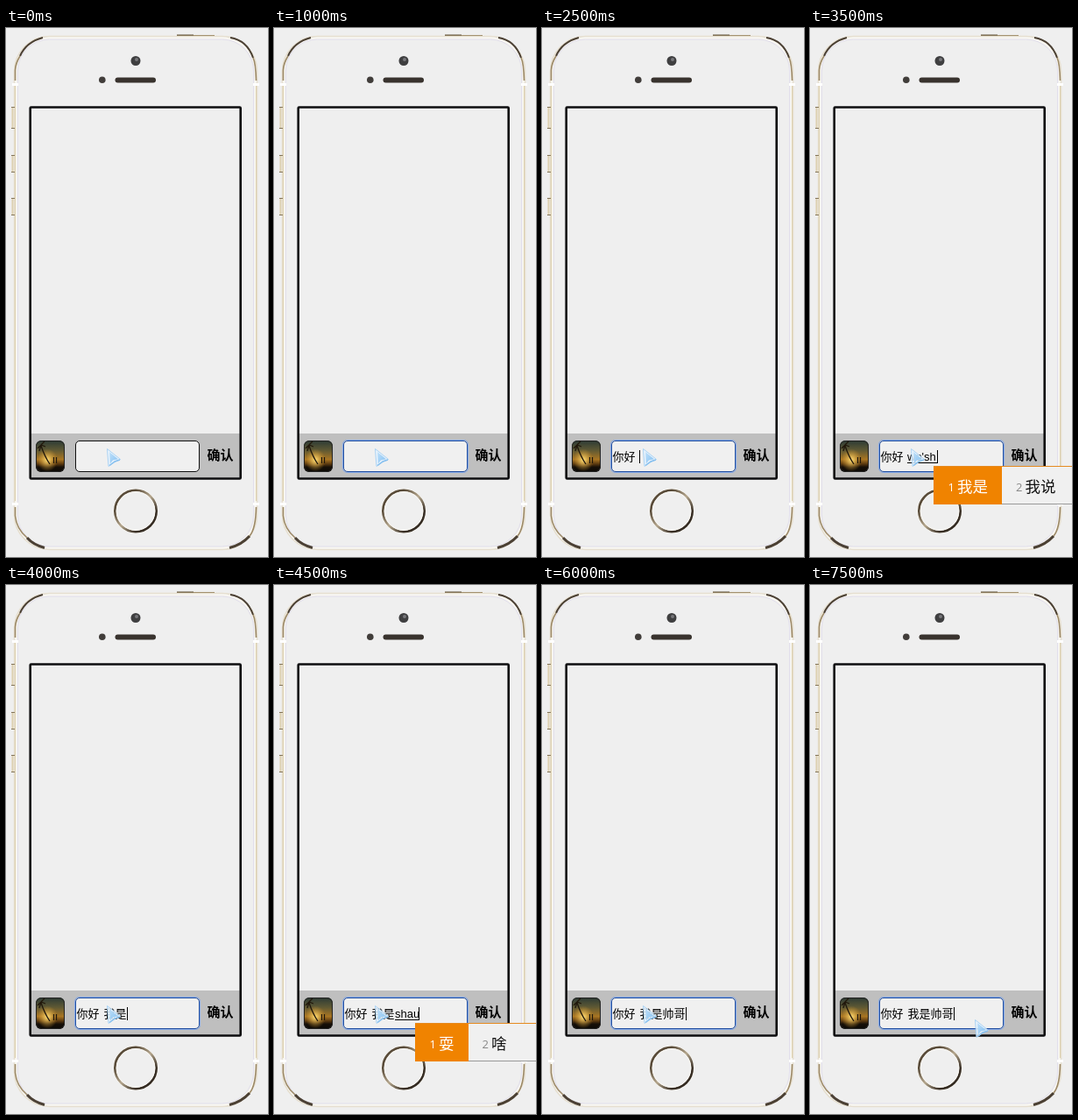
An HTML page for the animation above (8 s loop, 299 by 604 pixels).

```html
<!DOCTYPE html>
<html lang="zh-CN">
<head>
<meta charset="utf-8">
<title>Chat input</title>
<style>
  html, body { margin: 0; width: 100%; height: 100%; overflow: hidden; background: #efefef; }
  svg { display: block; width: 299px; height: 604px; }
  text { font-family: "Liberation Sans", "Noto Sans CJK SC", "Noto Sans CJK", sans-serif; white-space: pre; }
  .typed { font-size: 13px; word-spacing: 1.4px; fill: #000; }
  .word { font: 17.5px "Noto Sans CJK SC", "Noto Sans CJK", sans-serif; fill: #111; }
  .num { font: 13px "Open Sans", sans-serif; fill: #888; }
  .first .word, .first .num { fill: #fff; }
  .confirm { font: bold 15px "Noto Sans CJK SC", "Noto Sans CJK", sans-serif; }
</style>
</head>
<body>
<svg viewBox="0 0 299 604">
  <defs>
    <linearGradient id="ring" x1="0" y1="0" x2="1" y2="1">
      <stop offset="0" stop-color="#5d4f3d"/><stop offset=".25" stop-color="#574937"/>
      <stop offset=".5" stop-color="#b5a78e"/><stop offset=".75" stop-color="#3a3026"/>
      <stop offset="1" stop-color="#2c241c"/>
    </linearGradient>
    <linearGradient id="sky" x1="0" y1="0" x2="0" y2="1">
      <stop offset="0" stop-color="#2c3a35"/><stop offset=".3" stop-color="#5d5834"/>
      <stop offset=".6" stop-color="#a87522"/><stop offset=".74" stop-color="#5c3a10"/>
      <stop offset=".84" stop-color="#171008"/><stop offset="1" stop-color="#0b0906"/>
    </linearGradient>
    <radialGradient id="sun" cx=".4" cy=".62" r=".36">
      <stop offset="0" stop-color="#ffe07a"/><stop offset="1" stop-color="#d9982a" stop-opacity="0"/>
    </radialGradient>
    <linearGradient id="arrow" x1="0" y1="0" x2="1" y2="1">
      <stop offset="0" stop-color="#b9defa"/><stop offset="1" stop-color="#7dbcf0"/>
    </linearGradient>
    <clipPath id="thumb"><rect x="34" y="471" width="33" height="36" rx="6"/></clipPath>
  </defs>

  <!-- phone body -->
  <g fill="none">
    <rect x="9.500" y="9.500" width="277" height="586" rx="40" stroke="#e6dfcf" stroke-width="1.600"/>
    <rect x="11.500" y="11.500" width="273" height="582" rx="38" stroke="#f9f7f1" stroke-width="2"/>
    <rect x="13.500" y="13" width="269" height="579" rx="36" stroke="#e2dfec"/>
    <path d="M10.500 66V540M285.500 66V540" stroke="#dccfae"/>
    <g stroke="#4b4034" stroke-width="2">
      <path d="M16 32Q23 16 42 11M256 11Q275 14 282 34"/>
      <path d="M24 582Q31 590 44 593.500M255 593.500Q269 590 278 580" stroke-width="3"/>
    </g>
    <g stroke="#9c8967" stroke-width="1.600">
      <path d="M10.500 60V48Q11 40 16 32M282 34Q285 40 285.500 60"/>
      <path d="M10.500 547V557Q12 572 24 582M278 580Q285 572 285.500 547"/>
    </g>
    <path d="M195 8.500H238" stroke="#a3916f"/>
    <path d="M195 8H214" stroke="#65573f"/>
    <path d="M7.500 90V115M7.500 145V165M7.500 194V214" stroke="#ddd0b0" stroke-width="2"/>
    <path d="M6 90.500H10M6 114.500H10M6 145.500H10M6 164.500H10M6 194.500H10M6 213.500H10" stroke="#83755a"/>
    <path d="M7 64.500H14M282 64.500H289M7 543.500H14M282 543.500H289" stroke="#fff" stroke-width="3"/>
    <circle cx="148" cy="551.500" r="25.300" stroke="#f8f6f0"/>
    <circle cx="148" cy="551.500" r="23.700" stroke="url(#ring)" stroke-width="2.600"/>
    <circle cx="148" cy="551.500" r="21.800" stroke="#faf8f3"/>
  </g>
  <circle cx="148" cy="37.500" r="5.500" fill="#3f3f40"/>
  <circle cx="149" cy="36" r="2" fill="#77777a"/>
  <circle cx="109.800" cy="59.300" r="3.800" fill="#413d3a"/>
  <rect x="124.500" y="56.500" width="46.500" height="6" rx="3" fill="#39332e"/>

  <!-- screen and input bar -->
  <rect x="28" y="463" width="240" height="51" fill="#bfbfbf"/>
  <rect x="27.700" y="90.500" width="240" height="424" rx="1" fill="none" stroke="#0e0e10" stroke-width="2.600"/>
  <g clip-path="url(#thumb)">
    <rect x="34" y="471" width="33" height="36" fill="url(#sky)"/>
    <rect x="34" y="471" width="33" height="36" fill="url(#sun)"/>
    <path d="M40 477Q44 489 50 498M36 480L40 476L45 478M40 476L38 483M40 476L44 472M54.500 490V497M57.500 490V497" fill="none" stroke="#20170b" stroke-width="1.300"/>
  </g>
  <rect x="34.500" y="471.500" width="32" height="35" rx="6" fill="none" stroke="#222"/>
  <rect id="halo" x="78.500" y="470.500" width="143" height="37" rx="5" fill="none" stroke="#86a9e6"/>
  <rect id="field" x="79.500" y="471.500" width="141" height="35" rx="4.500" fill="#f0f0f0"/>
  <text class="confirm" x="229.500" y="492.500">确认</text>

  <text id="done" class="typed" x="80.500" y="494"></text>
  <text id="draft" class="typed" y="494"></text>
  <path id="underline" stroke="#000"/>
  <path id="caret" stroke="#000"/>
  <g id="popup"></g>
  <g id="mouse" stroke-linejoin="round">
    <path d="M115.500 480.500L130.500 492.500L125 495L117 500.500Z" fill="#eaf5fe" fill-opacity=".85" stroke="#a9d2f4"/>
    <path d="M118 484L128 492.300L122 493.500L118.800 497.500Z" fill="url(#arrow)" fill-opacity=".9"/>
    <path d="M118 499.500L124 495L130 493" fill="none" stroke="#86bfee" stroke-width="1.500"/>
  </g>
</svg>
<script>
const STEP = 500;
const $ = id => document.getElementById(id);

// One entry per step: committed text, text being composed, its left edge, caret, candidates
const hello = { done: "你好 ", caret: 111 };
const iAm = { done: "你好 我是", left: 138 };
const full = { done: "你好 我是帅哥", caret: 164 };
const states = [
  { idle: true },
  { caret: 80 },
  {},
  { draft: "ni'h", left: 80, caret: 100, words: ["你好", "你还", "你会"] },
  { draft: "ni'hao", left: 80, caret: 114, words: ["你好", "拟好", "你"] },
  hello,
  { ...hello, caret: 0 },
  { done: "你好 ", draft: "wo'sh", left: 111, caret: 145, words: ["我是", "我说"] },
  { done: "你好 我是", caret: 138 },
  { ...iAm, draft: "shau", caret: 165, words: ["耍", "啥"] },
  { ...iAm, draft: "shaui", caret: 168, words: ["耍", "啥"] },
  { ...iAm, draft: "shaui'g", caret: 178, words: ["帅哥", "啥"] },
  full,
  { ...full, caret: 0 },
  { ...full, caret: 0 },
  { ...full, moved: true }
];

function candidates(x, words) {
  let left = x;
  const cells = words.map((word, i) => {
    const width = 43 + 17.5 * word.length;
    const cell = `<g class="${i ? "" : "first"}">` +
      (i ? "" : `<rect x="${x}" y="500" width="${Math.round(width)}" height="44" fill="#f08300"/>`) +
      `<text class="num" x="${left + 16.5}" y="529">${i + 1}</text>` +
      `<text class="word" x="${left + 27}" y="529.5">${word}</text></g>`;
    left += width - (i ? 0 : 0.5);
    return cell;
  });
  return `<rect x="${x}" y="500" width="${299 - x}" height="44" fill="#f0f0f0"/>` +
    `<path d="M${x} 543.5H299" stroke="#999"/>` + cells.join("") +
    `<path d="M${x} 500.5H299" stroke="#e58a20"/>`;
}

function show({ idle, done = "", draft = "", left = 80, caret, words, moved }) {
  $("halo").style.display = idle ? "none" : "";
  $("field").setAttribute("stroke", idle ? "#111" : "#234f9f");
  $("done").textContent = done;
  $("draft").textContent = draft;
  $("draft").setAttribute("x", left);
  $("underline").setAttribute("d", draft ? `M${left} 496.5H${caret}` : "");
  $("caret").setAttribute("d", caret ? `M${caret + 0.5} 482V497` : "");
  $("popup").innerHTML = words ? candidates(caret - 4, words) : "";
  $("mouse").setAttribute("transform", moved ? "translate(73 16)" : "");
}

let current = -1;
function tick() {
  const index = Math.floor(performance.now() / STEP) % states.length;
  if (index !== current) show(states[current = index]);
  requestAnimationFrame(tick);
}
tick();
</script>
</body>
</html>
```
